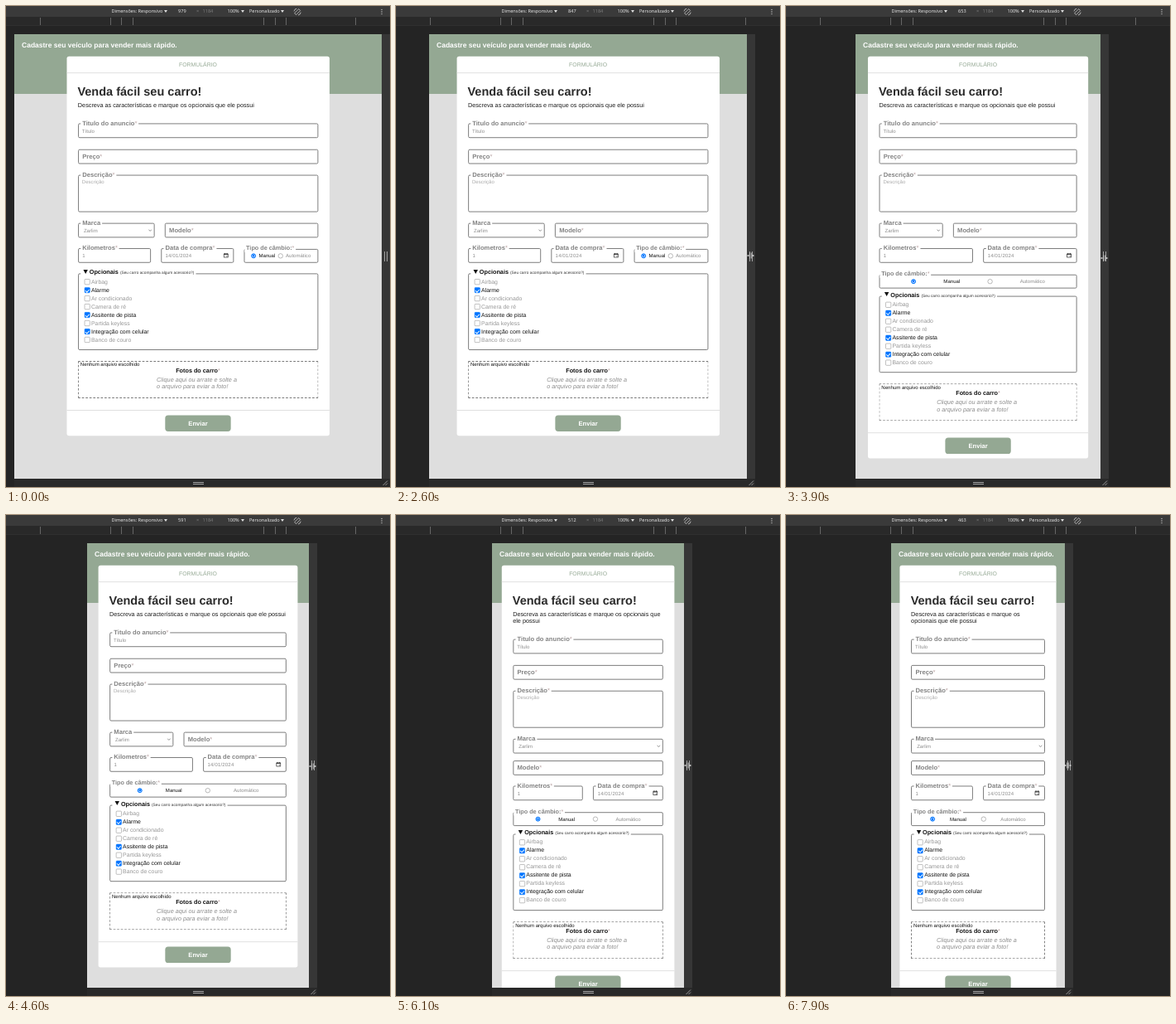
An HTML page for the animation above (8 s loop, 464 by 580 pixels).

```html
<!DOCTYPE html>
<html lang="pt-BR">
<head>
<meta charset="utf-8">
<title>Formulário responsivo</title>
<style>
* { box-sizing: border-box; margin: 0; padding: 0; }
html, body { width: 100%; height: 100%; overflow: hidden; background: #242424; }
#stage {
  --n: 979;
  --w: calc(var(--n) * .4535px);
  --left: calc(232px - var(--w) / 2);
  --right: calc(232px + var(--w) / 2);
  position: relative; width: 464px; height: 580px; overflow: hidden;
  background: #242424; text-rendering: geometricPrecision;
}
#stage > * { position: absolute; }

/* device toolbar */
.tools { inset: 0 0 auto; height: 13px; background: #3a3a3a; color: #eee; font: 5.6px/13px 'Open Sans', 'Noto Sans', sans-serif; white-space: nowrap; }
.tools > * { position: absolute; top: 0; }
.dim { color: #808080; }
.tools > .drop { top: 5.4px; border: solid transparent; border-width: 3px 2px 0; border-top-color: #ddd; }
.ruler { inset: 13px 0 auto; height: 11px; background: #292929; border-bottom: 1px solid #303030; }
.ruler i { position: absolute; top: 1px; width: 1px; height: 9px; background: #666; }
.side { left: var(--right); top: 34px; width: 10px; height: 536px; background: #363636; }
.base { left: var(--left); top: 570px; width: calc(var(--w) + 10px); height: 10px; background: #292929; }
.grip { border: solid #a4a4a4; }
.grip.v { left: calc(var(--right) + 3.4px); top: 295.5px; width: 3.4px; height: 12px; border-width: 0 1px; }
.grip.h { left: 225.5px; top: 573.5px; width: 13px; height: 3.4px; border-width: 1px 0; }
.corner { left: calc(var(--right) + 1.5px); top: 572px; }
.cursor { left: calc(var(--right) - .5px); margin-top: -4px; }

/* page, laid out in its own pixels */
.page {
  left: var(--left); top: 34px; width: calc(var(--n) * 1px); height: 1182px; overflow: hidden;
  transform: scale(.4535); transform-origin: 0 0; container-type: inline-size;
  background: linear-gradient(#94a893 159px, #dedede 159px);
  font: 16px/18.4px 'Liberation Sans', Arial, sans-serif; color: #1c1c1c;
}
h3 { position: absolute; left: 20px; top: 17.5px; font-size: 18.72px; line-height: 21px; color: #fff; white-space: nowrap; }
.card { position: absolute; top: 59px; left: 0; right: 0; width: min(700px, 90%); margin: auto; background: #fff; border-radius: 6px; }
.tab { height: 45px; border-bottom: 2px solid #ddd; text-align: center; font-size: 15.2px; line-height: 45px; color: #94a893; }
.body { padding: 30px 30px 31px; }
h1 { font-size: 32px; line-height: 37px; margin: 0 0 9.4px -1px; white-space: nowrap; color: #2b2b2b; }
.box { position: relative; height: 39px; border: 2px solid #707070; border-radius: 4px; font-size: 13.33px; line-height: 20px; color: #8c8c8c; white-space: nowrap; }
.box > b, .box > span { position: absolute; }
.box > b { left: 5.7px; top: -12px; padding: 0 4px; background: #fff; font-size: 16.8px; color: #838383; }
.box.in > b { top: 7.5px; }
.box > span { left: 9px; top: 9px; }
em { font-style: normal; font-weight: 400; color: #b9a2a2; }
.text { height: 99px; margin: 29px 0; }
.text > span { top: 7px; color: #aaa; }
.row { display: grid; column-gap: 27px; }
.two { grid-template-columns: minmax(170px, 1fr) minmax(0, 2fr); row-gap: 19px; }
.three { grid-template-columns: 1fr 1fr 1.02fr; margin-top: 28px; align-items: end; }
.box > svg { position: absolute; }
.gear { height: 37px; padding: 0 10px; display: flex; justify-content: space-evenly; align-items: center; }
.gear > b { left: 0; top: -13px; font-size: 16px; }
.gear > span { position: static; }
.gear > .on { color: #111; }
.gear i { width: 13px; height: 13px; border: 1.5px solid #6c6c6c; border-radius: 50%; }
.gear i.on { border: 2px solid #0075ff; background: #0075ff; box-shadow: inset 0 0 0 1.5px #fff; }
.opts { height: 204px; margin: 28px 0 29px; padding: 9.6px 0 0 15px; }
.opts > b { top: -14px; color: #111; font-size: 16px; padding-right: 5px; }
.opts > b::before { content: ''; display: inline-block; margin: 0 4px 1px 3px; border: solid transparent; border-width: 11px 6.5px 0; border-top-color: #111; }
.opts small { font-size: 10.6px; font-weight: 400; color: #333; }
.opts p { display: flex; align-items: center; gap: 3.5px; height: 22px; font-size: 15.2px; color: #969696; }
.opts p::before { content: ''; width: 13px; height: 13px; border: 1px solid #767676; border-radius: 2.5px; }
.opts .on { position: relative; color: #111; }
.opts .on::before { background: #0075ff; border-color: #0075ff; }
.opts .on::after { content: ''; position: absolute; left: 4.5px; top: 6px; width: 4.5px; height: 8px; border: solid #fff; border-width: 0 2px 2px 0; transform: rotate(42deg); }
.drop-zone { height: 99px; border: 2px dashed #666; border-radius: 2px; }
.drop-zone > span { left: 4.5px; top: -1.5px; color: #111; }
.drop-zone > b { left: 0; right: 0; top: 14px; text-align: center; font-size: 16px; color: #111; background: none; }
.drop-zone > p { position: absolute; left: calc(50% - 110px); top: 40px; font: italic 16px/18.4px 'Liberation Sans', Arial, sans-serif; color: #8c8c8c; }
.foot { height: 69px; padding-top: 12px; border-top: 2px solid #ddd; }
.foot b { display: block; width: 175px; margin: auto; border-radius: 8px; background: #94a893; color: #fff; text-align: center; font-size: 16.8px; line-height: 43px; }

@container (max-width: 662px) {
  .three { grid-template-columns: 1fr 1fr; row-gap: 31px; }
  .gear { grid-column: 1 / -1; }
  .opts { margin-top: 20.5px; }
}
@container (max-width: 514px) {
  .two { grid-template-columns: 1fr; }
}
</style>
</head>
<body>
<div id="stage">
  <div class="tools">
    <span style="left:127.5px">Dimensões: Responsivo</span><i class="drop" style="left:191px"></i>
    <span id="size" style="left:208px">979</span>
    <span class="dim" style="left:230px">×</span><span class="dim" style="left:237.5px">1184</span>
    <span style="left:267.5px">100%</span><i class="drop" style="left:283.5px"></i>
    <span style="left:294px">Personalizado</span><i class="drop" style="left:332px"></i>
    <svg style="left:347px;top:1.5px" width="10" height="10" fill="none" stroke="#ccc" stroke-width=".8"><path d="M6.8 1.6 8.6 3.6 3.6 8.6 1.6 6.6Z M1 4.4Q1.4 1.6 4.2 1.2 M9.2 5.6Q8.8 8.6 6 9"/></svg>
    <svg style="left:452px;top:2.5px" width="4" height="9" fill="#ccc"><circle cx="2" cy="1.4" r=".7"/><circle cx="2" cy="4" r=".7"/><circle cx="2" cy="6.6" r=".7"/></svg>
  </div>
  <div class="ruler" id="ruler"></div>

  <div class="page">
    <h3>Cadastre seu veículo para vender mais rápido.</h3>
    <div class="card">
      <div class="tab">FORMULÁRIO</div>
      <div class="body">
        <h1>Venda fácil seu carro!</h1>
        <p>Descreva as características e marque os opcionais que ele possui</p>
        <div class="box" style="margin:38.2px 0 30px"><b>Titulo do anuncio<em>*</em></b><span>Título</span></div>
        <div class="box in"><b>Preço<em>*</em></b></div>
        <div class="box text"><b>Descrição<em>*</em></b><span>Descrição</span></div>
        <div class="row two">
          <div class="box"><b>Marca</b><span style="left:13.5px">Zarlim</span>
            <svg style="right:5px;top:14px" width="10" height="8" fill="none" stroke="#777" stroke-width="1.8"><path d="M1 1.5 5 5.5 9 1.5"/></svg></div>
          <div class="box in"><b>Modelo<em>*</em></b></div>
        </div>
        <div class="row three">
          <div class="box"><b>Kilometros<em>*</em></b><span style="left:10px">1</span></div>
          <div class="box"><b>Data de compra<em>*</em></b><span style="left:10px;letter-spacing:.35px">14/01/2024</span>
            <svg style="right:12px;top:10px" width="14" height="14" fill="none" stroke="#111" stroke-width="1.5"><path d="M1.5 3H12.5V12.5H1.5Z M1.5 4.5H12.5 M4 .5V3 M10 .5V3 M8 9.5H10.5"/></svg></div>
          <div class="box gear"><b>Tipo de câmbio:<em>*</em></b><i class="on"></i><span class="on">Manual</span><i></i><span>Automático</span></div>
        </div>
        <div class="box opts">
          <b>Opcionais <small>(Seu carro acompanha algum acessorio?)</small></b>
          <p>Airbag</p>
          <p class="on">Alarme</p>
          <p>Ar condicionado</p>
          <p>Camera de ré</p>
          <p class="on">Assitente de pista</p>
          <p>Partida keyless</p>
          <p class="on">Integração com celular</p>
          <p>Banco de couro</p>
        </div>
        <div class="box drop-zone">
          <span>Nenhum arquivo escolhido</span>
          <b>Fotos do carro<em>*</em></b>
          <p>Clique aqui ou arrate e solte a<br>o arquivo para eviar a foto!</p>
        </div>
      </div>
      <div class="foot"><b>Enviar</b></div>
    </div>
  </div>

  <div class="side"></div>
  <div class="base"></div>
  <div class="grip v"></div>
  <div class="grip h"></div>
  <svg class="corner" width="7" height="7" stroke="#a4a4a4" stroke-width=".9"><path d="M.5 6 6 .5 M3.5 6 6 3.5"/></svg>
  <svg class="cursor" id="cursor" width="9" height="8" stroke="#ddd" fill="#ddd" stroke-width=".7"><path d="M3.6 .5V7.5 M5.4 .5V7.5 M1 4H3 M6 4H8"/><path stroke="none" d="M0 4 1.8 2.8V5.2Z M9 4 7.2 2.8V5.2Z"/></svg>
</div>
<script>
const LOOP = 8000, STEP = 100;
const widths = [[1700, 979], [1800, 975], [2600, 847], [3400, 715], [3500, 699], [4400, 596], [4600, 591], [5300, 551],
  [5500, 539], [6200, 507], [6700, 491], [6800, 491], [7400, 471], [7600, 471], [7900, 463]];
const heights = [[1800, 298], [3400, 304], [4600, 303], [5500, 302]];
const get = id => document.getElementById(id);
const stage = get('stage'), size = get('size'), cursor = get('cursor');

get('ruler').innerHTML = [41, 126, 139, 153, 311, 325, 338, 422]
  .map(x => `<i style="left:${x}px"></i>`).join('');

function at(keys, t) {
  const i = keys.findIndex(k => k[0] >= t);
  if (i < 0) return keys[keys.length - 1][1];
  if (i === 0) return keys[0][1];
  const [t0, a] = keys[i - 1], [t1, b] = keys[i];
  return a + (b - a) * (t - t0) / (t1 - t0);
}

function draw(now) {
  const t = Math.floor(now % LOOP / STEP) * STEP;
  const n = Math.round(at(widths, t));
  stage.style.setProperty('--n', n);
  size.textContent = n;
  cursor.style.top = at(heights, t) + 'px';
  cursor.style.visibility = t < 1400 ? 'hidden' : 'visible';
}

const start = performance.now();
function tick() {
  draw(performance.now() - start);
  requestAnimationFrame(tick);
}
tick();
</script>
</body>
</html>
```
